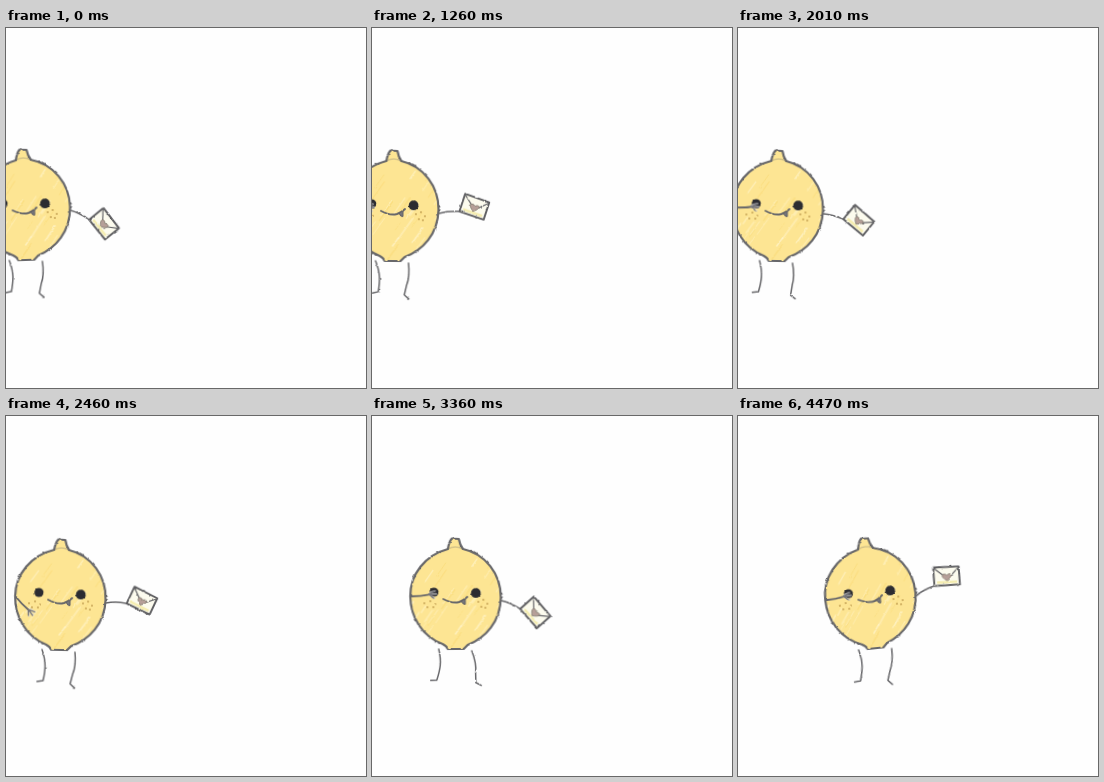
An HTML page that plays this animation: 360 by 360 pixels, repeating every 4500 ms.

```html
<!DOCTYPE html>
<html lang="en">
<head>
<meta charset="utf-8">
<title>Lemon with a letter</title>
<style>
  html, body { margin: 0; width: 100%; height: 100%; overflow: hidden; background: #fefefe; }
  svg { display: block; width: 100vw; height: 100vh; }
  .pencil { fill: none; stroke: #67676a; stroke-width: 1.9; stroke-linecap: round; stroke-linejoin: round; }
  .thin { stroke-width: 1.5; }
</style>
</head>
<body>
<svg viewBox="0 0 360 360">
  <defs>
    <filter id="rough" filterUnits="userSpaceOnUse" x="-90" y="-100" width="200" height="210" color-interpolation-filters="sRGB">
      <feTurbulence type="fractalNoise" baseFrequency=".22" numOctaves="2" seed="4"/>
      <feDisplacementMap in="SourceGraphic" scale="2.2" xChannelSelector="R" yChannelSelector="G"/>
    </filter>
    <path id="skin" d="M-7-47Q-6-54-3-57.500L4-57Q5-51 8-47C30-42 46-22 45.500 2C45 26 30 42 12 49L8 53L-8 53Q-9 50-13 48C-34 40-45 20-45 0C-45-22-30-41-7-47Z"/>
    <clipPath id="inside"><use href="#skin"/></clipPath>
  </defs>
  <g id="lemon"><g filter="url(#rough)">
    <g id="legL" class="pencil thin"><path d="M0 0C2 6 3 10 3 16Q3 22 1 31L-5 32"/></g>
    <g id="legR" class="pencil thin"><path d="M0 0C2 8 3 14 1 22L0 32L5 35.500"/></g>
    <use href="#skin" fill="#fde593"/>
    <g id="crayon" clip-path="url(#inside)" fill="none" stroke-linecap="round"></g>
    <use href="#skin" class="pencil" style="stroke-width:2.2"/>
    <path class="pencil thin" d="M-7-47Q0-51 8-47" opacity=".25"/>
    <g fill="#2c2c31">
      <circle cx="-21.300" cy="-4" r="4.600"/>
      <circle cx="20.600" cy="-2.800" r="4.900"/>
    </g>
    <path class="pencil" d="M-12 3Q-3 8 4 6Q9 4 12 1"/>
    <path d="M6 5L10 3L10 8.500Q7.500 9 6 5Z" fill="#77777b" stroke="#606064"/>
    <g id="freckles" fill="#c3a052"></g>
    <g id="armL">
      <path class="pencil" d="M0 0Q10 1 19 0"/>
      <path class="pencil" style="stroke:#cfcfcf;stroke-width:2" opacity=".65" d="M20-2L25-3M20 0L26 0M20 1L24 4"/>
      <path class="pencil" style="stroke:#74747a;stroke-width:1.2" d="M19 0L25-3M19 0L26 1M19 0L23 4"/>
    </g>
    <g id="armR">
      <path class="pencil thin" d="M0 0Q9-1 20 1.500"/>
      <g transform="translate(36 0) rotate(27)">
        <path class="pencil" d="M-12.500-10L13-8.500L12.500 9.500L-13 8.500Z" style="fill:#fcfbee;stroke:#5d5d60"/>
        <path d="M-10 5.500L10 6.500" stroke="#f5edb0" stroke-width="2.500"/>
        <path class="pencil" style="stroke-width:1.2" d="M-12-9L-2 0M13-8L4 0"/>
        <path d="M0 4.500C-8-1-3-4 .5-1C4-4 8-1 0 4.500Z" fill="#b69f98" stroke="#827b70" stroke-width=".8"/>
      </g>
    </g>
  </g></g>
</svg>
<script>
  const LOOP = 4500;
  const $ = id => document.getElementById(id);

  // Tracks of [ms, value], read with straight lines between the points
  const walk = [[0, 18.5], [255, 15.3], [750, 19.3], [1260, 21], [1620, 28], [2010, 39.5], [2700, 62],
    [2970, 72], [3270, 79], [3360, 83.3], [3810, 102], [3960, 107.5], [4380, 127], [4460, 132], [4500, 134]];
  const bob = [[0, 179], [1260, 180], [2010, 180], [2960, 182], [3360, 180], [3960, 180], [4460, 179.5]];
  const lean = [[0, -2], [1260, .5], [2010, 1], [2960, 1.5], [3360, -.5], [3960, .3], [4460, -6]];
  const stepL = [[0, -5], [400, 0], [1260, 0], [2010, 1.5], [2960, 0], [3360, 2], [3960, -10.5], [4460, 12]];
  const stepR = [[0, 13], [400, 0], [1260, -2], [2010, 2], [2960, 0], [3360, -3], [3960, 4], [4460, -3]];

  function at(track, t) {
    const i = track.findIndex(p => p[0] > t);
    if (i < 0) return track[track.length - 1][1];
    const [t0, a] = track[i - 1], [t1, b] = track[i];
    return a + (b - a) * (t - t0) / (t1 - t0);
  }

  function add(parent, tag, attrs) {
    const el = document.createElementNS('http://www.w3.org/2000/svg', tag);
    for (const k in attrs) el.setAttribute(k, attrs[k]);
    parent.append(el);
  }

  function place(id, x, y, angle) {
    $(id).setAttribute('transform', `translate(${x} ${y}) rotate(${angle})`);
  }

  let seed = 17;
  const rnd = () => (seed = seed * 16807 % 2147483647) / 2147483647;

  // Slanted crayon strokes
  for (let i = 0; i < 46; i++) {
    const x = rnd() * 96 - 50, y = rnd() * 100 - 45, len = 6 + rnd() * 17;
    add($('crayon'), 'path', {
      d: `M${x} ${y}l${len * .7} ${-len}`,
      stroke: i % 3 ? '#fff6d2' : '#f9da76',
      'stroke-width': .8 + rnd() * 1.2,
      opacity: .35 + rnd() * .35
    });
  }

  for (const [x, y] of [[23, 6], [28, 4], [32, 8], [26, 11], [30, 12],
    [-31, 7], [-25, 5], [-20, 8], [-28, 11], [-22, 11]])
    add($('freckles'), 'circle', { cx: x, cy: y, r: .95 });

  function draw(now) {
    // Twenty poses a second
    const t = Math.max(0, 50 * Math.ceil((now % LOOP - 5) / 50) - 40);
    const s = t / 1000;
    const beat = Math.PI * (1.93 * s + .118 * s * s);
    const swing = 25.5 * Math.cos(beat) - 1.5;
    const wave = ((1 + Math.cos((beat - 1.5 * Math.PI) / 2)) / 2) ** 3;

    place('lemon', at(walk, t), at(bob, t), at(lean, t));
    place('armR', 46, 5, swing);
    place('armL', -45, 0, 50 * wave - 5);
    place('legL', -17, 53, .25 * swing - 1 + at(stepL, t));
    place('legR', 16, 55, 4.5 - .42 * swing + at(stepR, t));
  }

  let start;
  function tick(now) {
    start ??= now;
    draw(now - start);
    requestAnimationFrame(tick);
  }
  draw(0);
  requestAnimationFrame(tick);
</script>
</body>
</html>
```
